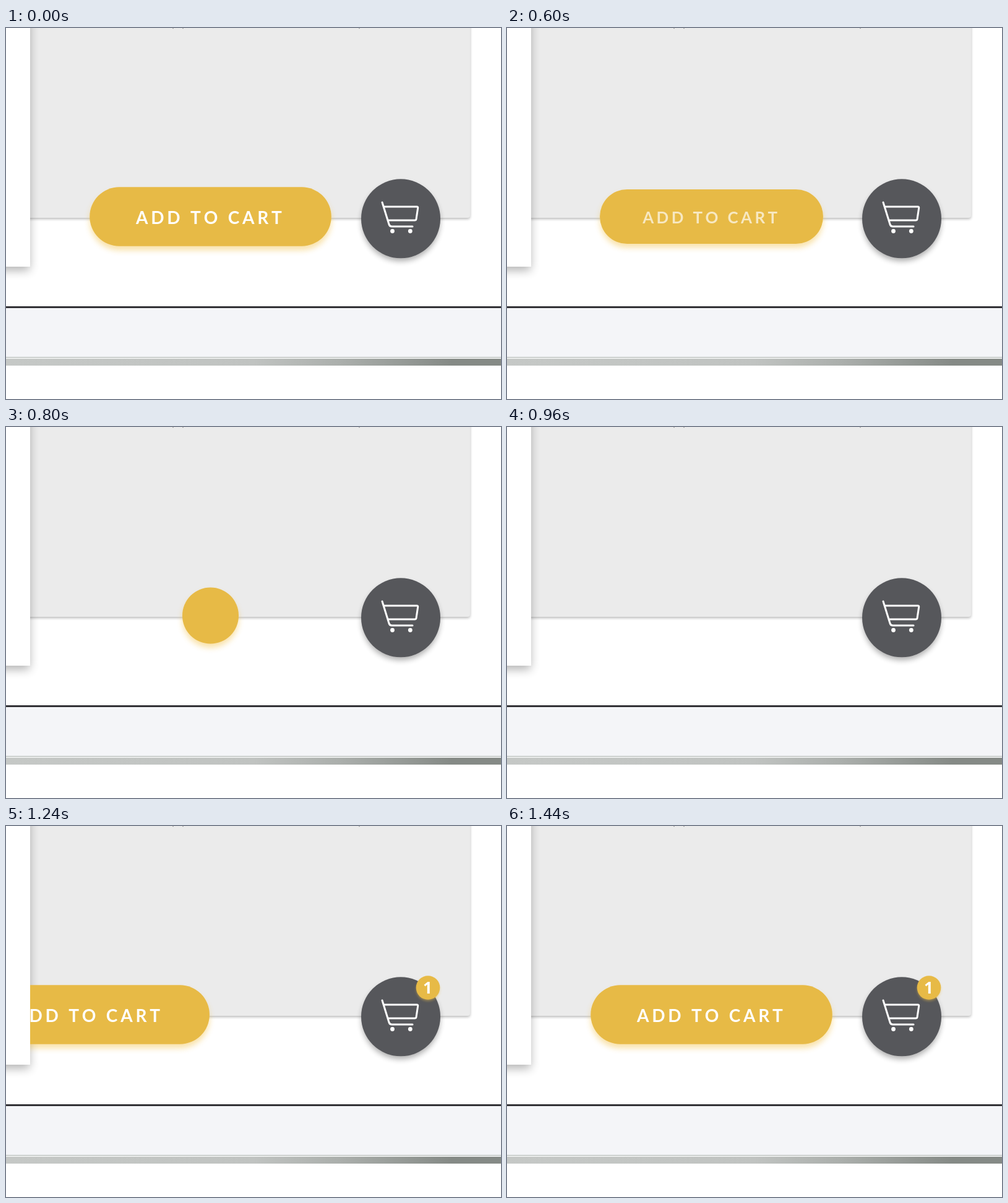
An HTML page for the animation above (2.6 s loop, 800 px wide and 600 px high).

```html
<!DOCTYPE html>
<html lang="en">
<head>
<meta charset="utf-8">
<title>Add to cart</title>
<style>
  html, body { margin: 0; width: 100%; height: 100%; overflow: hidden; background: #fff; }
  svg { display: block; width: 100vw; height: 100vh; }
  .label { font: 700 28px Lato, sans-serif; letter-spacing: 4.8px; font-kerning: none; }
  .count { font: 700 26px "Open Sans", "Noto Sans", sans-serif; text-anchor: middle; }
</style>
</head>
<body>
<svg viewBox="0 0 800 600">
  <defs>
    <filter id="soft2" x="-20%" y="-20%" width="140%" height="140%"><feGaussianBlur stdDeviation="2"/></filter>
    <filter id="soft5" x="-50%" y="-50%" width="200%" height="200%"><feGaussianBlur stdDeviation="5"/></filter>
    <filter id="soft8" x="-100%" y="-20%" width="300%" height="140%"><feGaussianBlur stdDeviation="8"/></filter>
    <linearGradient id="edge">
      <stop offset="0" stop-color="#c5c8c6"/>
      <stop offset=".5" stop-color="#c0c3c1"/>
      <stop offset=".68" stop-color="#aaaeab"/>
      <stop offset=".9" stop-color="#858a86"/>
      <stop offset="1" stop-color="#858a86"/>
    </linearGradient>
    <clipPath id="right"><rect x="39" width="761" height="600"/></clipPath>
  </defs>

  <rect width="800" height="600" fill="#fff"/>

  <!-- product panel -->
  <rect x="-20" y="-20" width="770" height="329" rx="4" opacity=".28" filter="url(#soft2)"/>
  <rect x="-20" y="-20" width="770" height="327" rx="4" fill="#ebebeb"/>
  <path d="M271-1l-1.5 2M287-1l-1.5 2M572-1l-1.5 2" stroke="#999" stroke-width="1.5"/>

  <!-- side card -->
  <rect x="-40" y="-40" width="78" height="432" opacity=".3" filter="url(#soft8)"/>
  <rect x="-40" y="-40" width="79" height="426" fill="#fff"/>

  <!-- screen edge -->
  <rect y="450" width="800" height="3" fill="#323136"/>
  <rect y="453" width="800" height="79" fill="#f4f5f8"/>
  <rect y="532" width="800" height="1" fill="#b3b8b5"/>
  <rect y="533" width="800" height="2" fill="#eceeed"/>
  <rect y="535" width="800" height="11" fill="url(#edge)"/>

  <g clip-path="url(#right)">
    <g id="button">
      <rect class="pill" y="-41" height="95.5" rx="47.75" fill="#f2c044" opacity=".45" filter="url(#soft5)"/>
      <rect class="pill" y="-47.75" height="95.5" rx="47.75" fill="#e7ba46"/>
      <text id="label" class="label" x="-120.5" y="11.5" fill="#fff">ADD TO CART</text>
    </g>
  </g>

  <!-- cart -->
  <circle cx="638" cy="314" r="63" opacity=".32" filter="url(#soft5)"/>
  <circle cx="638" cy="308.3" r="64" fill="#56575b"/>
  <g fill="none" stroke="#fff" stroke-width="3" stroke-linecap="round" stroke-linejoin="round">
    <path d="M608 282L619 317.5Q620 321 623.500 321H657"/>
    <path d="M611 289H664Q666 289 665.700 291L663 309Q662.600 311 660.500 311H617.500"/>
  </g>
  <g fill="#fff">
    <circle cx="624.500" cy="328.500" r="3.400"/>
    <circle cx="653.300" cy="328.500" r="3.400"/>
  </g>

  <g id="badge">
    <circle cy="2.500" r="18.500" fill="#e7ba46" opacity=".6" filter="url(#soft2)"/>
    <circle r="19.300" fill="#e7ba46"/>
    <text class="count" x="-.5" y="9.300" fill="#fff">1</text>
  </g>
</svg>
<script>
const LOOP = 2600, STEP = 40;
const FULL = 390.5, ROUND = 95.5;
const HOME = { x: 330.5, y: 305 }, CART = { x: 638, y: 308 };

const byId = id => document.getElementById(id);
const button = byId("button"), label = byId("label"), badge = byId("badge");
const pills = document.querySelectorAll(".pill");

const part = (t, a, b) => Math.min(1, Math.max(0, (t - a) / (b - a)));
const mix = (a, b, u) => a + (b - a) * u;
const outSine = u => Math.sin(u * Math.PI / 2);
const inOut = u => (1 - Math.cos(u * Math.PI)) / 2;

function place(el, x, y, scale) {
  el.setAttribute("transform", `translate(${x} ${y}) scale(${scale})`);
}

function drawButton(t) {
  let { x, y } = HOME, scale = 1, width = FULL, ink = 1, shown = true;
  if (t < 1040) {
    // press, collapse to a ball, then hop behind the cart
    const press = outSine(part(t, 440, 575));
    const fold = inOut(part(t, 600, 800));
    const hop = part(t, 800, 960);
    scale = mix(1, 0.924, press) + 0.029 * fold;
    width = mix(FULL, ROUND, fold);
    ink = 1 - part(t, 550, 700);
    x = mix(HOME.x, CART.x, hop);
    y = mix(HOME.y, CART.y, hop) - 4 * 103 * hop * (1 - hop);
    shown = hop < 1;
  } else {
    x -= 672 * (1 - outSine(part(t, 1040, 1440)));
  }
  button.style.display = shown ? "" : "none";
  place(button, x, y, scale);
  label.setAttribute("opacity", ink);
  for (const pill of pills) {
    pill.setAttribute("x", -width / 2);
    pill.setAttribute("width", width);
  }
}

function drawBadge(t) {
  const size = outSine(part(t, 960, 1140));
  badge.style.display = size ? "" : "none";
  place(badge, 682, 261.5, size);
}

function draw(now) {
  const t = Math.floor(now % LOOP / STEP) * STEP;
  drawButton(t);
  drawBadge(t);
}

const start = performance.now();
function tick() {
  draw(performance.now() - start);
  requestAnimationFrame(tick);
}
tick();
</script>
</body>
</html>
```
